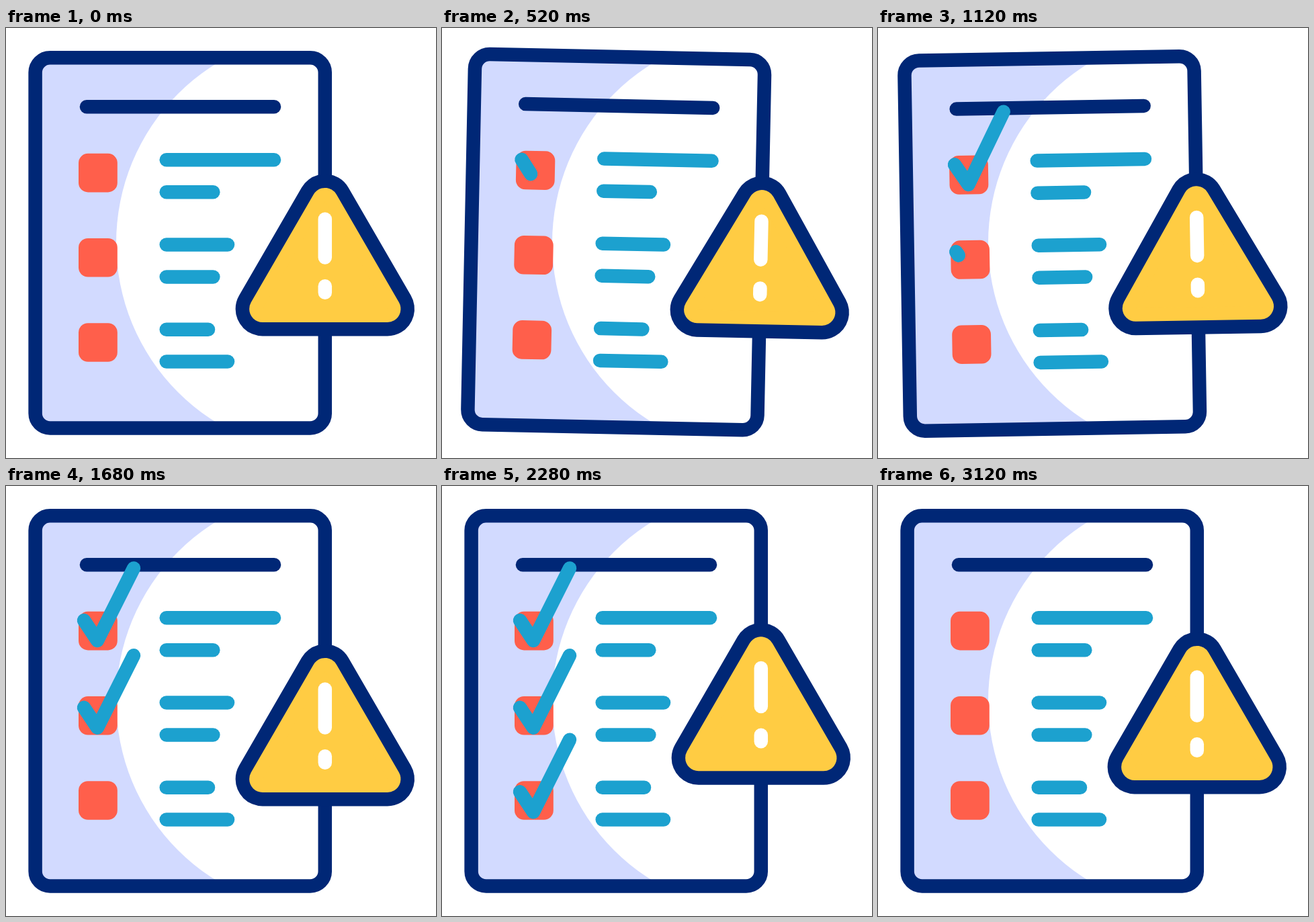
An HTML page with a canvas that plays this animation: 640x640 px, repeating every 3.16 s.

```html
<!DOCTYPE html>
<html lang="en">
<head>
<meta charset="utf-8">
<title>Checklist warning</title>
<style>
html, body { margin: 0; height: 100%; overflow: hidden; background: #fff; }
canvas { display: block; width: 100vw; height: 100vh; }
</style>
</head>
<body>
<canvas id="stage" width="640" height="640"></canvas>
<script>
const ctx = document.getElementById('stage').getContext('2d');
const LOOP = 3160, LINE = 20.5, TRIM = 333;
const NAVY = '#002776', TEAL = '#1ca1cf', RED = '#ff5f4b',
      LILAC = '#d2daff', YELLOW = '#ffcc43', WHITE = '#fff';

// Text lines: right end, y
const rows = [[399, 196.2], [308.3, 244.3], [330, 322.4],
              [308.3, 370.4], [301, 448.8], [330, 496.6]];
// Items: box top, tick top, time drawn, time erased
const items = [[186.8, 122.5, 436, 2342],
               [313, 252.2, 1080, 2525],
               [439.2, 377.7, 1707, 2768]];
const TICK = Math.hypot(20, 30) + Math.hypot(54, 107.5);

const ease = x => {
  x = Math.min(1, Math.max(0, x));
  return x * x * (3 - 2 * x);
};

// Swing through three peaks and settle back to zero
function wobble(t, peaks) {
  const times = [0, 267, 667, 1000, 1233];
  const values = [0, ...peaks, 0];
  let v = 0;
  for (let i = 1; i < times.length; i++) {
    const p = ease((t - times[i - 1]) / (times[i] - times[i - 1]));
    v += (values[i] - values[i - 1]) * p;
  }
  return v;
}

function trace(points) {
  ctx.beginPath();
  points.forEach(([x, y]) => ctx.lineTo(x, y));
}

function stroke(color, width = LINE) {
  ctx.strokeStyle = color;
  ctx.lineWidth = width;
  ctx.stroke();
}

function line(x1, y1, x2, y2, color) {
  trace([[x1, y1], [x2, y2]]);
  stroke(color);
}

function fillRound(x, y, w, h, r, color) {
  ctx.beginPath();
  ctx.roundRect(x, y, w, h, r);
  ctx.fillStyle = color;
  ctx.fill();
}

function page(angle) {
  const shape = [43.6, 44.3, 431.2, 551.2, 22];
  fillRound(...shape, LILAC);
  // The white disc stays upright while the page turns
  ctx.save();
  ctx.clip();
  turn(-angle);
  ctx.beginPath();
  ctx.arc(478, 320, 314, 0, 7);
  ctx.fillStyle = WHITE;
  ctx.fill();
  ctx.restore();
  ctx.beginPath();
  ctx.roundRect(...shape);
  stroke(NAVY);
  line(120, 117.2, 399, 117.2, NAVY);
  rows.forEach(([x, y]) => line(238.7, y, x, y, TEAL));
}

function tick(y, from, to) {
  if (to <= from) return;
  ctx.save();
  ctx.setLineDash([TICK * (to - from), 999]);
  ctx.lineDashOffset = -TICK * from;
  trace([[116, y + 77.5], [136, y + 107.5], [190, y]]);
  stroke(TEAL);
  ctx.restore();
}

function warning(dy) {
  ctx.save();
  ctx.translate(0, dy);
  trace([[381.8, 418.2], [474.8, 257.6], [567.8, 418.2]]);
  ctx.closePath();
  stroke(NAVY, 80.4);
  stroke(YELLOW, 39.4);
  ctx.fillStyle = YELLOW;
  ctx.fill();
  line(474.8, 284.5, 474.8, 341.5, WHITE);
  line(474.8, 384.2, 474.8, 393.7, WHITE);
  ctx.restore();
}

function turn(angle) {
  ctx.translate(320, 320);
  ctx.rotate(angle);
  ctx.translate(-320, -320);
}

function draw() {
  const t = performance.now() % LOOP;
  const angle = wobble(t, [-3, 3, -2]) * Math.PI / 180;
  ctx.fillStyle = WHITE;
  ctx.fillRect(0, 0, 640, 640);
  ctx.lineCap = ctx.lineJoin = 'round';
  ctx.save();
  turn(angle);
  page(angle);
  items.forEach(([top]) => fillRound(108, top, 57.8, 57.6, 14, RED));
  items.forEach(([, y, on, off]) =>
    tick(y, ease((t - off) / TRIM), ease((t - on) / TRIM)));
  warning(wobble(t - 1483, [21.6, -26.8, 11.9]));
  ctx.restore();
  requestAnimationFrame(draw);
}
draw();
</script>
</body>
</html>
```
